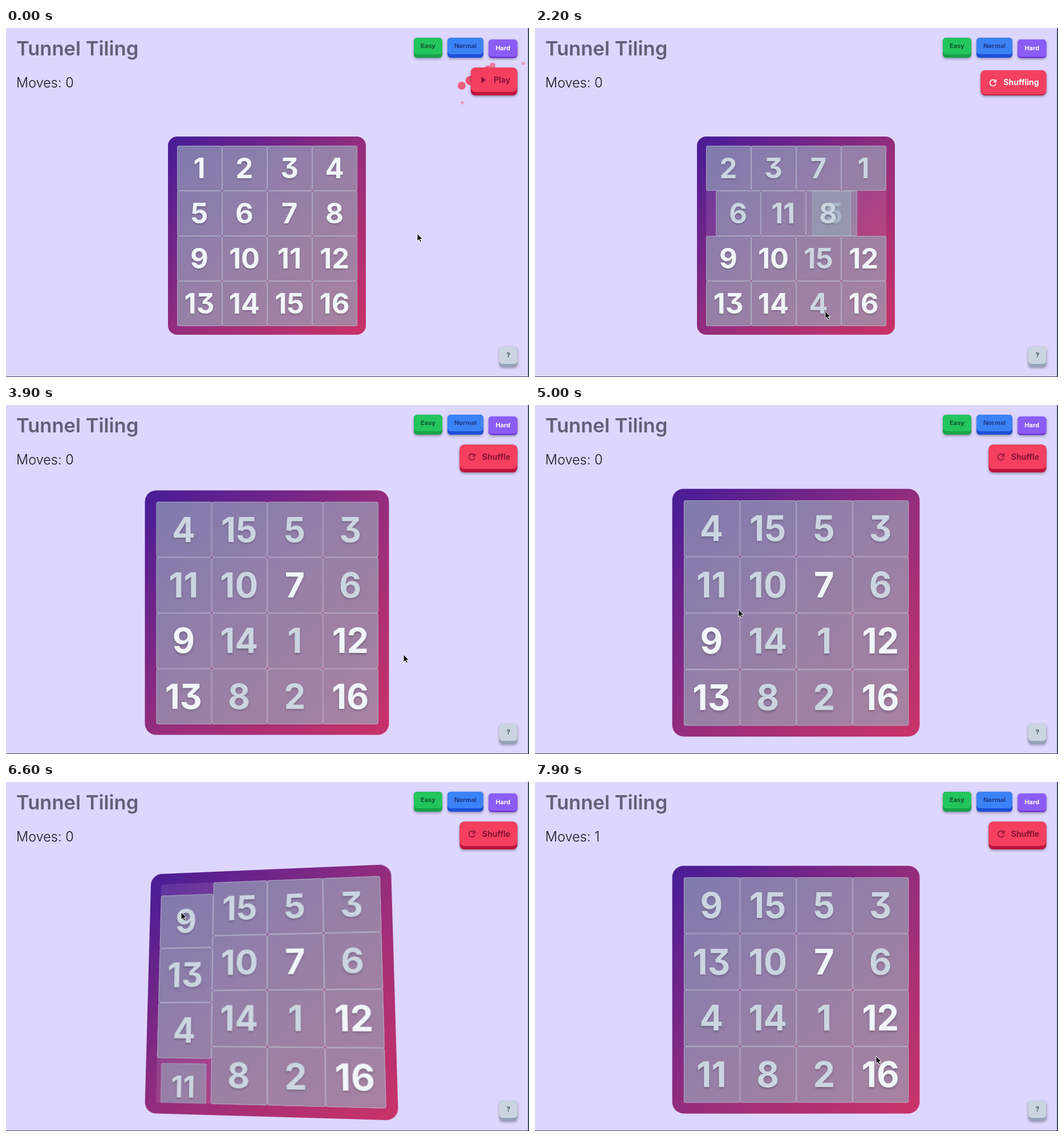
An HTML page for the animation above (8 s loop, 917 by 611 pixels).

```html
<!DOCTYPE html>
<html lang="en">
<head>
<meta charset="utf-8">
<title>Sliding tiles</title>
<style>
html, body { margin: 0; width: 100%; height: 100%; overflow: hidden; background: #ddd6fe; }
body { position: relative; font-family: Inter, Roboto, sans-serif; }
svg { position: absolute; left: 0; top: 0; width: 917px; height: 611px; }
.btn { filter: drop-shadow(0 2px 2px rgba(0, 0, 0, .35)); }
#board {
  position: absolute; left: 284px; top: 190px; width: 347px; height: 347px; border-radius: 16px;
  background: linear-gradient(135deg, #4c1d95 4%, #962d7c 52%, #c7326a 97%);
}
#well {
  position: absolute; left: 15.5px; top: 15.5px; width: 316px; height: 316px;
  overflow: hidden; border-radius: 3px; background: rgba(255, 255, 255, .1);
}
.tile {
  position: absolute; left: 0; top: 0; width: 79px; height: 79px; box-sizing: border-box;
  border: 1px solid rgba(203, 213, 225, .45); border-radius: 3px;
  background: rgba(148, 163, 184, .64);
  font-weight: 700; font-size: 49px; line-height: 77px; text-align: center;
  font-feature-settings: "cv09"; text-shadow: 0 2px 3px rgba(0, 0, 0, .2);
}
</style>
</head>
<body>
<svg id="page" viewBox="0 0 917 611">
  <text x="18" y="48" font-size="34.5" font-weight="600" fill="#645e78">Tunnel Tiling</text>
  <text id="moves" x="18" y="104" font-size="23.5" font-weight="300" fill="#15131c"></text>
  <g id="sparks" fill="#f43f5e"></g>
  <g id="buttons"></g>
  <rect x="915.3" width="1.7" height="611" fill="#26334a"/>
  <rect y="610" width="917" height="1" fill="#3d4a63"/>
</svg>
<div id="board"><div id="well"></div></div>
<svg viewBox="0 0 917 611">
  <path id="cursor" d="M0 0V13L3 10.4L5.2 15L7.4 14L5.3 9.6H9.5Z" fill="#111" stroke="#fff" stroke-width=".9"/>
</svg>
<script>
const LOOP = 8000, CELL = 79, CENTER = { x: 457.5, y: 363.5 };
const PRESS = 1150, READY = 3560, GRAB = 5280, DROP = 7150;
const $ = id => document.getElementById(id);
const clamp = v => Math.max(0, Math.min(1, v));
const progress = (t, start, length) => clamp((t - start) / length);
const outQuad = p => 1 - (1 - p) ** 2;
const outCubic = p => 1 - (1 - p) ** 3;
const smooth = p => p * p * (3 - 2 * p);
const mix = (a, b, p) => a + (b - a) * p;

function svg(tag, attrs, parent, text) {
  const el = document.createElementNS('http://www.w3.org/2000/svg', tag);
  for (const key in attrs) el.setAttribute(key, attrs[key]);
  if (text) el.textContent = text;
  return parent.appendChild(el);
}

function button(x, y, w, h, depth, [face, edge, ink], label, size, textX = x + w / 2) {
  const g = svg('g', { class: 'btn' }, $('buttons'));
  const rx = size > 12 ? 8 : 6;
  svg('rect', { x, y, width: w, height: h, rx, fill: edge }, g);
  svg('rect', { x, y, width: w, height: h - depth, rx, fill: face }, g);
  svg('text', {
    x: textX, y: y + (h - depth) / 2 + size * .36, 'font-size': size,
    'font-weight': 700, 'text-anchor': 'middle', fill: ink
  }, g, label);
  return g;
}

function refreshIcon(g, x, y, color) {
  svg('path', {
    d: 'M4 -3.6A5.4 5.4 0 1 0 5.2 1.4M5.4 -6V-1.6H1', transform: `translate(${x} ${y})`,
    fill: 'none', stroke: color, 'stroke-width': 1.6
  }, g);
}

const RED = ['#f43f5e', '#be123c', '#881337'];
button(715, 17, 50, 35, 6, ['#22c55e', '#16a34a', '#14532d'], 'Easy', 11);
button(774, 17, 63, 35, 6, ['#3b82f6', '#1d4ed8', '#1e3a8a'], 'Normal', 11);
button(846, 20, 50.5, 32.5, 2, ['#8b5cf6', '#6d28d9', '#fff'], 'Hard', 11);
button(865, 558, 31.5, 35, 5, ['#cbd5e1', '#94a3b8', '#475569'], '?', 12);
const play = button(815, 69.5, 81.5, 48.5, 6, RED, 'Play', 14, 869.5);
svg('path', { d: 'M833.5 85.5V96.5L842 91Z', fill: RED[2] }, play);
const shuffling = button(781.5, 74, 115, 44, 1.5, [RED[0], RED[1], '#fff'], 'Shuffling', 14, 852.5);
refreshIcon(shuffling, 803, 96, '#fff');
const shuffle = button(795.5, 69.5, 101, 48.5, 6, RED, 'Shuffle', 14, 859.5);
refreshIcon(shuffle, 817, 91, RED[2]);

// Sparks: x, y and age at the start of the loop.
const sparks = [
  [799, 101, .25], [814, 92, .12], [853, 66, .45], [845, 71, .4], [907, 62, .68], [800, 131, .7]
].map(([x, y, age]) => {
  const dx = x - 856, dy = y - 93, dist = Math.hypot(dx, dy);
  return { ux: dx / dist, uy: dy / dist, dist, age, el: svg('circle', {}, $('sparks')) };
});

// Cell indices run row by row; every move shifts a line one step back.
const lineCells = move => [0, 1, 2, 3].map(i => move[0] === 'r' ? move[1] * 4 + i : i * 4 + +move[1]);
function shiftLine(grid, move) {
  const next = grid.slice(), cells = lineCells(move);
  cells.forEach((cell, i) => next[cell] = grid[cells[(i + 1) % 4]]);
  return next;
}
const moves = ['r0', 'c2', 'r1', 'c2', 'r0', 'c2', 'r1', 'c1', 'r0', 'c2'];
const starts = [1240, 1710, 2145, 2520, 2720, 2890, 3045, 3205, 3300, 3390];
const grids = [Array.from({ length: 16 }, (_, i) => i + 1)];
moves.forEach((move, i) => grids.push(shiftLine(grids[i], move)));

const tiles = grids[0].map(n => {
  const el = document.createElement('div');
  el.className = 'tile';
  el.textContent = n;
  return $('well').appendChild(el);
});

function placeTile(n, col, row, home, scale = 1) {
  const style = tiles[n - 1].style;
  style.transform = `translate(${col * CELL}px, ${row * CELL}px) scale(${scale})`;
  style.color = home ? '#f1f5f9' : '#cbd5e1';
}

const path = [
  [0, 721, 360], [100, 724, 356], [900, 856, 94], [1200, 858, 95], [1800, 590, 395], [2200, 508, 496],
  [2450, 692, 441], [2650, 697, 437], [4350, 697, 437], [5050, 331, 352], [5200, 325, 385],
  [5300, 302, 401], [5450, 302, 394], [5800, 302, 352], [6600, 307, 228], [7000, 308, 209],
  [7150, 308, 208], [7650, 590, 472], [7850, 598, 480], [LOOP, 598, 480]
];
function cursorAt(t) {
  const i = path.findIndex((key, k) => k && t <= key[0]);
  const [t0, x0, y0] = path[i - 1], [t1, x1, y1] = path[i];
  const p = (t - t0) / (t1 - t0);
  return { x: mix(x0, x1, p), y: mix(y0, y1, p) };
}

function drawTiles(t, cursor) {
  const done = starts.filter(s => s <= t).length;
  const grid = grids[done], before = grids[Math.max(0, done - 1)];
  const gap = done < starts.length ? starts[done] - starts[done - 1] : 110;
  const p = done ? outCubic(progress(t, starts[done - 1], Math.min(140, gap))) : 1;
  grid.forEach((n, cell) => {
    const from = done ? before.indexOf(n) : cell;
    placeTile(n, mix(from % 4, cell % 4, p), mix(from >> 2, cell >> 2, p), cell === n - 1);
  });
  if (t >= GRAB) drawDrag(t, cursor, grid);
}

function drawDrag(t, cursor, grid) {
  const pulled = Math.min(0, (cursor.y - 401) / 97);
  const shift = t < DROP ? pulled : mix(-1.98, -2, outCubic(progress(t, DROP, 200)));
  for (let row = 0; row < 4; row++) {
    const n = grid[row * 4];
    const slot = (row + shift + 4.5) % 4 - .5;
    const outside = Math.max(0, -slot, slot - 3);
    const rest = Math.round(slot) % 4;
    placeTile(n, 0, slot, rest * 4 === n - 1, 1 - .17 * Math.min(1, outside / .2));
  }
}

function drawBoard(t, cursor) {
  const scale = 1 + .25 * outQuad(progress(t, READY, 460));
  const tilt = smooth(progress(t, GRAB, 270)) * (1 - smooth(progress(t, DROP, 450)));
  const ry = 8.1 * tilt * (cursor.x - CENTER.x) / 217;
  const rx = -7.2 * tilt * (cursor.y - CENTER.y) / 217;
  $('board').style.transform = tilt
    ? `perspective(600px) rotateX(${rx}deg) rotateY(${ry}deg) scale(${scale})`
    : `scale(${scale})`;
}

function drawSparks(t) {
  $('sparks').style.display = t < PRESS + 250 ? '' : 'none';
  const fade = 1 - progress(t, PRESS, 250);
  for (const s of sparks) {
    const age = (s.age + t / 1000) % 1;
    const dist = s.dist + (age - s.age) * 45;
    s.el.setAttribute('cx', 856 + s.ux * dist);
    s.el.setAttribute('cy', 93 + s.uy * dist);
    s.el.setAttribute('r', 9.3 * (1 - age));
    s.el.setAttribute('opacity', (1 - age * .85) * fade);
  }
}

function render(t) {
  const cursor = cursorAt(t);
  $('cursor').setAttribute('transform', `translate(${cursor.x} ${cursor.y})`);
  $('moves').textContent = `Moves: ${t < DROP + 50 ? 0 : 1}`;
  play.style.display = t < PRESS ? '' : 'none';
  shuffling.style.display = t >= PRESS && t < READY ? '' : 'none';
  shuffle.style.display = t >= READY ? '' : 'none';
  drawSparks(t);
  drawTiles(t, cursor);
  drawBoard(t, cursor);
}

const begin = performance.now();
function frame() {
  render((performance.now() - begin) % LOOP);
  requestAnimationFrame(frame);
}
frame();
</script>
</body>
</html>
```
